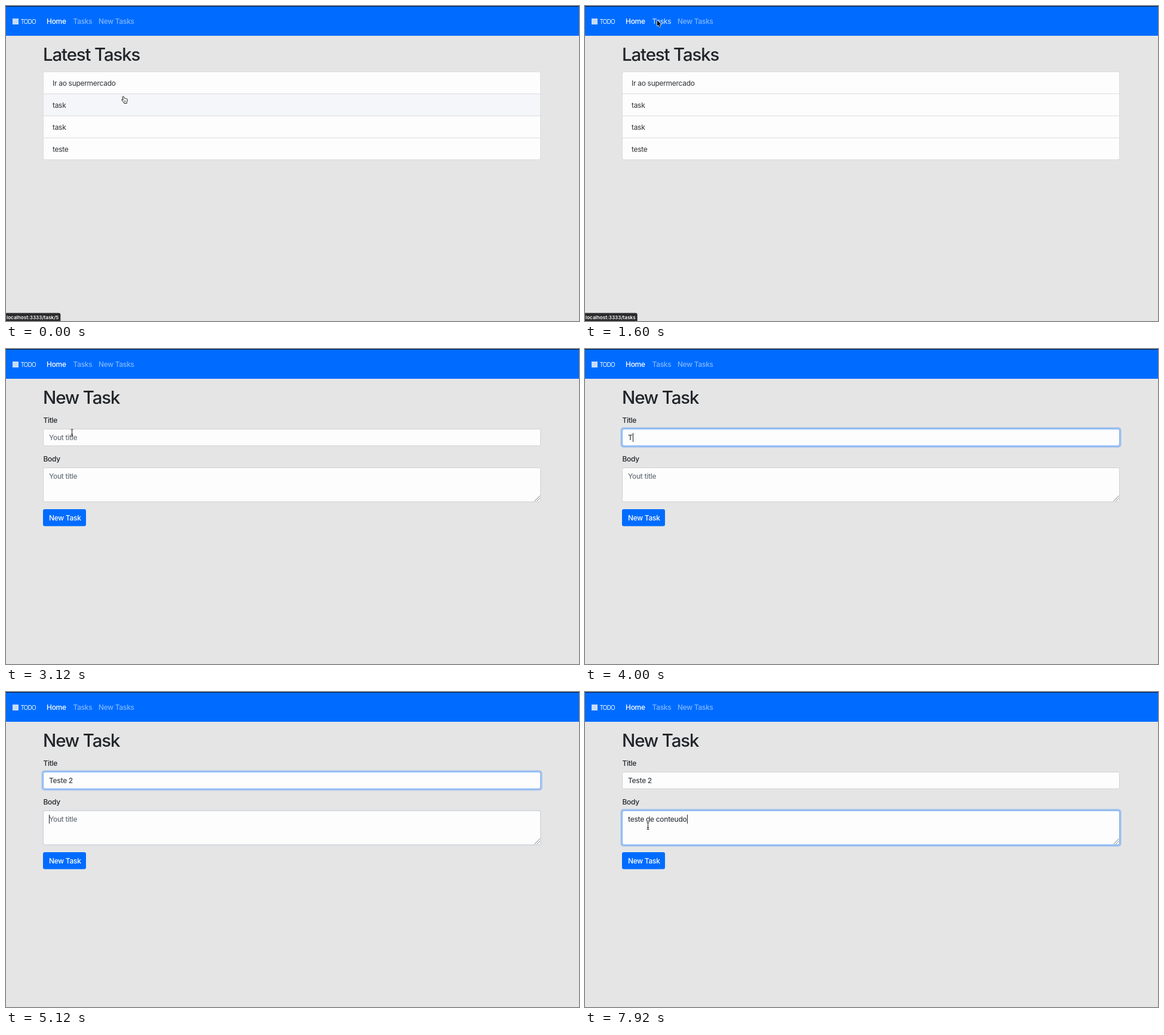
Recreate the animation shown at these times as an HTML page with a canvas. Size 960 px wide and 529 px high, loop 8 s.

```html
<!DOCTYPE html>
<html lang="en">
<head>
<meta charset="utf-8">
<title>Todo</title>
<style>
  html, body { margin: 0; width: 100%; height: 100%; overflow: hidden; background: #e5e5e5; }
  canvas { display: block; }
</style>
</head>
<body>
<canvas id="stage" width="960" height="529"></canvas>
<script>
const ctx = document.getElementById('stage').getContext('2d');
const LOOP = 8000, STEP = 80;
const BLUE = '#006cff', INK = '#212529', PAPER = '#fdfdfd';
const FONT = 'Inter, "Open Sans", sans-serif';

const PAGE_SWAP = 2320, TITLE_FOCUS = 3180, BODY_FOCUS = 5100;
const POINTER_HIDES = 4000, POINTER_RETURNS = 7840;
const LIST = { x: 62.5, y: 110.5, w: 833, row: 36.9 };
const TASKS = ['Ir ao supermercado', 'task', 'task', 'teste'];
const LINKS = [
  { label: 'Home', x: 68, from: 62, to: 106, url: '' },
  { label: 'Tasks', x: 112.5, from: 106, to: 149, url: 'tasks' },
  { label: 'New Tasks', x: 155, from: 149, to: 220, url: 'new' }
];

const title = {
  text: 'Teste 2',
  times: [4000, 4080, 4240, 4400, 4480, 4800, 4960]
};
const body = {
  text: 'teste de conteudo',
  times: [5680, 5760, 5840, 6000, 6080, 6160, 6320, 6400, 6560]
};
for (let i = 0; i < 8; i++) body.times.push(6800 + i * 91);

// time, x, y of the pointer's hot spot
const PATH = [
  [0, 196, 151], [880, 84, 24], [1280, 84, 24], [1600, 121, 24],
  [2080, 174, 23], [2720, 174, 23], [3200, 105, 150],
  [7760, 105, 207], [7920, 105, 225]
];

const ARROW = new Path2D('M0 0V9.6L2.2 7.6 3.8 11.2 5.4 10.5 3.8 7H6.8Z');
const HAND = new Path2D('M2.2 .8C3 .4 3.8 .8 4 1.6L4.6 4.2C5 3.6 6 3.7 6.3 4.4 6.9 4 7.7 4.2 8 4.9 8.7 4.6 9.6 5 9.7 5.8 10 7.8 9.7 9 9 10.5L8.9 12.3H4.4L4 11C2.8 9.8 1.6 8.3 .6 7.2-.1 6.3 1 5.6 1.8 6.2L2.8 7 1.7 2.4C1.5 1.6 1.7 1.1 2.2 .8Z');

const clamp = v => Math.max(0, Math.min(1, v));
const smooth = v => { v = clamp(v); return v * v * (3 - 2 * v); };

function setFont(size, weight, tracking, family = FONT) {
  ctx.font = `${weight} ${size}px ${family}`;
  ctx.letterSpacing = `${tracking * size}px`;
}

function label(str, x, y, color = INK, weight = 400) {
  setFont(12, weight, -0.025);
  ctx.fillStyle = color;
  ctx.fillText(str, x, y);
}

function heading(str) {
  setFont(29.5, 500, -0.04);
  ctx.fillStyle = INK;
  ctx.fillText(str, 62, 92);
}

function box(x, y, w, h, radius, fill, stroke) {
  ctx.beginPath();
  ctx.roundRect(x, y, w, h, radius);
  ctx.fillStyle = fill;
  ctx.fill();
  if (stroke) {
    ctx.lineWidth = 1;
    ctx.strokeStyle = stroke;
    ctx.stroke();
  }
}

function line(x1, y1, x2, y2, color) {
  ctx.beginPath();
  ctx.moveTo(x1, y1);
  ctx.lineTo(x2, y2);
  ctx.lineWidth = 1;
  ctx.strokeStyle = color;
  ctx.stroke();
}

function pointerAt(t) {
  let i = 0;
  while (i < PATH.length - 2 && t >= PATH[i + 1][0]) i++;
  const [t0, x0, y0] = PATH[i], [t1, x1, y1] = PATH[i + 1];
  const p = smooth((t - t0) / (t1 - t0));
  return {
    x: x0 + (x1 - x0) * p,
    y: y0 + (y1 - y0) * p,
    visible: t < POINTER_HIDES || t >= POINTER_RETURNS
  };
}

function drawNav(hovered) {
  ctx.fillStyle = BLUE;
  ctx.fillRect(0, 0, 960, 50);
  ctx.fillStyle = '#04183c';
  ctx.fillRect(0, 0, 960, 1);
  ctx.fillStyle = '#c6dcf8';
  ctx.fillRect(11, 21, 10, 10);
  setFont(10, 400, -0.08, '"Open Sans", sans-serif');
  ctx.fillStyle = '#fff';
  ctx.fillText('TODO', 25, 29.5);
  LINKS.forEach((link, i) => {
    const alpha = i === 0 ? 1 : link === hovered ? 0.75 : 0.5;
    label(link.label, link.x, 30, `rgba(255,255,255,${alpha})`, 500);
  });
}

function drawList(hoveredRow) {
  const { x, y, w, row } = LIST;
  heading('Latest Tasks');
  box(x, y, w, row * 4, 3, PAPER);
  TASKS.forEach((task, i) => {
    const top = y + row * i;
    if (i === hoveredRow) {
      ctx.fillStyle = '#f4f6fa';
      ctx.fillRect(x, top, w, row);
    }
    if (i) line(x, Math.round(top) + 0.5, x + w, Math.round(top) + 0.5, '#dcdcdc');
    label(task, 78, top + 23.3, '#2d3136');
  });
  box(x, y, w, row * 4, 3, 'transparent', '#dcdcdc');
}

function drawField(field, y, h, baseline, focus, focusedAt, active, t) {
  if (focus > 0) box(59.5, y - 3, 839, h + 6, 5, `rgba(0,108,255,${0.3 * focus})`);
  box(62.5, y, 833, h, 3, PAPER, '#cdd1d5');
  if (focus > 0) box(62.5, y, 833, h, 3, 'transparent', `rgba(120,176,255,${focus})`);

  const count = field.times.filter(time => time <= t).length;
  const typed = field.text.slice(0, count);
  if (count) label(typed, 72, baseline, '#3b4148', 450);
  else label('Yout title', 72, baseline, '#6c757d', 450);

  const since = t - (count ? field.times[count - 1] : focusedAt);
  if (active && Math.floor(since / 500) % 2 === 0) {
    const x = Math.round(72 + (count ? ctx.measureText(typed).width : 0)) + 0.5;
    line(x, baseline - 12, x, baseline + 3, '#222');
  }
}

function drawForm(t) {
  const titleIn = smooth((t - TITLE_FOCUS) / 150);
  const bodyIn = smooth((t - BODY_FOCUS) / 150);
  const inBody = t >= BODY_FOCUS;
  heading('New Task');
  label('Title', 62.5, 124, INK, 450);
  drawField(title, 134.5, 28, 153, titleIn * (1 - bodyIn), TITLE_FOCUS, t >= TITLE_FOCUS && !inBody, t);
  label('Body', 62.5, 188.5, INK, 450);
  drawField(body, 199.5, 57, 218, bodyIn, BODY_FOCUS, inBody, t);
  line(885.5, 255.5, 894.5, 246.5, '#777');
  line(889.5, 255.5, 894.5, 250.5, '#777');
  box(62, 269, 72, 28.5, 3, BLUE);
  label('New Task', 72, 288, '#fff', 500);
}

function drawStatus(path) {
  const url = 'localhost:3333/' + path;
  setFont(8, 600, 0.01);
  const w = ctx.measureText(url).width + 4;
  box(-1, 515.5, w + 1, 15, [0, 3, 0, 0], '#2b2b2d');
  ctx.fillStyle = '#fff';
  ctx.fillText(url, 1, 525.5);
}

function drawPointer({ x, y }, shape) {
  ctx.save();
  ctx.translate(x, y);
  ctx.lineJoin = 'round';
  if (shape === 'beam') {
    line(0.5, -5, 0.5, 5, '#222');
    line(-1.5, -5.5, 2.5, -5.5, '#222');
    line(-1.5, 5.5, 2.5, 5.5, '#222');
    line(-1, 2.5, 2, 2.5, '#222');
  } else {
    const hand = shape === 'hand';
    const path = hand ? HAND : ARROW;
    if (hand) ctx.translate(-2.5, 0);
    ctx.lineWidth = hand ? 1 : 1.4;
    ctx.strokeStyle = hand ? '#111' : '#e8f0ff';
    ctx.fillStyle = hand ? '#fff' : '#000';
    if (hand) ctx.fill(path);
    ctx.stroke(path);
    if (hand) {
      line(5, 7.5, 5, 10, '#555');
      line(7, 7.5, 7, 10, '#555');
    } else ctx.fill(path);
  }
  ctx.restore();
}

function draw(t) {
  const pointer = pointerAt(t);
  const onForm = t >= PAGE_SWAP;
  const { x, y } = pointer;
  const hovered = pointer.visible && y > 8 && y < 42
    ? LINKS.find(link => x >= link.from && x < link.to) : undefined;
  const row = onForm ? -1 : Math.floor((y - LIST.y) / LIST.row);

  ctx.fillStyle = '#e5e5e5';
  ctx.fillRect(0, 0, 960, 529);
  drawNav(hovered);
  if (onForm) drawForm(t);
  else drawList(row);

  if (row >= 0) drawStatus('task/' + (6 - row));
  else if (hovered && (t < PAGE_SWAP || t >= 2800)) drawStatus(hovered.url);

  if (pointer.visible) {
    const inField = onForm && (y > 134 && y < 163 || y > 199 && y < 257);
    drawPointer(pointer, inField ? 'beam' : row >= 0 ? 'hand' : 'arrow');
  }
}

function tick() {
  const t = performance.now() % LOOP;
  draw(Math.floor(t / STEP) * STEP);
  requestAnimationFrame(tick);
}
tick();
</script>
</body>
</html>
```
